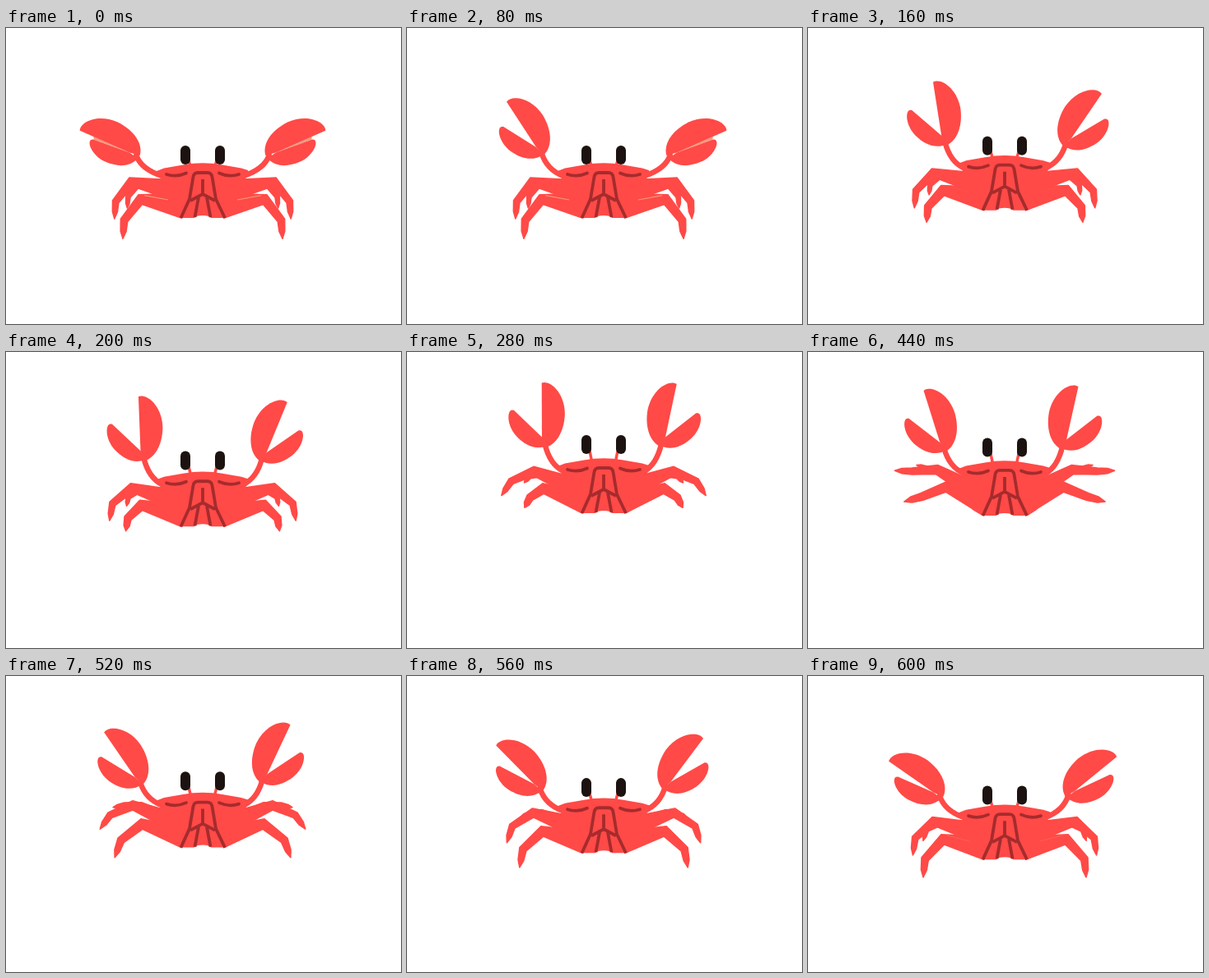
An HTML page for the animation above (640 ms loop, 480 by 360 pixels).

```html
<!DOCTYPE html>
<html lang="en">
<head>
<meta charset="utf-8">
<title>Jumping crab</title>
<style>
  html, body { margin: 0; width: 100%; height: 100%; overflow: hidden; background: #fff; }
  svg { display: block; width: 480px; height: 360px; }
  .red { fill: #ff4a47; }
  .leg { stroke: #ff4a47; stroke-width: 1.5; stroke-linejoin: round; }
  .arm { fill: none; stroke: #ff4a47; stroke-width: 6.5; stroke-linecap: round; }
  .marks { fill: none; stroke: #a62b2d; stroke-width: 3.8; stroke-linejoin: round; }
  .brow { stroke-linecap: round; }
  .seam { stroke: #f09a78; stroke-width: 1.2; }
  .gap { fill: #f39a7c; }
  .stalk { stroke: #ff4a47; stroke-width: 3.5; }
  .eye { fill: #1c1310; }
</style>
</head>
<body>
<svg viewBox="0 0 480 360">
  <g id="legs"></g>
  <g id="body">
    <path class="red" d="M183 174 L192 170.5 L215 166.5 Q239 162 263 166.5 L286 170.5 L294 173 Q296 178 291 183
      L300 188 L292 202 L278 224 L267 231 L249 231 Q247 228 239 228 Q231 228 229 231 L212 231
      L200 224 L186 202 L178 188 L188 183 Z"/>
    <g class="marks">
      <path class="brow" d="M195 178 Q207 182 219 176.5 M259 176.5 Q271 182 283 178"/>
      <path d="M212.5 231 L223 208 L227.5 181 Q228.5 176 233 176 L245 176 Q249.5 176 250.5 181 L255 208 L266 231"/>
      <path d="M239 184 V202 M224 210 L239 202 L254 210 M234 206 L229.5 230 M244 206 L248.5 230"/>
    </g>
  </g>
  <g id="claws"></g>
  <g id="eyes"></g>
</svg>
<script>
const LOOP = 640, STEP = 40;
const JUMP = { start: 80, top: 320, land: 635, height: 37.5 };
const FLARE = { start: 80, peak: 440 };

// spread: degrees the shin swings out; settle: how late it comes back; fold: shortening in mid-jump
const LEGS = [
  { top: [190, 186], low: [200, 206], thigh: 35, shin: 20, width: 3.4, spread: 65, settle: 2, fold: 0.3 },
  { top: [190, 184], low: [192, 206], thigh: 40, shin: 30, width: 4.7, spread: 48, settle: 1, fold: 0 },
  { top: [194, 202], low: [213, 231], thigh: 41, shin: 32, width: 5.3, spread: 30, settle: 0.7, fold: 0.4 }
];
const CLAWS = [
  { start: 0, peak: 240, hold: 260, swing: 66, small: 24 },
  { start: 80, peak: 280, hold: 420, swing: 54, small: 18 }
];

const RAD = Math.PI / 180;
const clamp = x => Math.max(0, Math.min(1, x));
const part = (t, from, to) => clamp((t - from) / (to - from));
const polar = ([x, y], deg, r) => [x + r * Math.cos(deg * RAD), y + r * Math.sin(deg * RAD)];
const smooth = x => x * x * (3 - 2 * x);

function add(parent, tag, attrs) {
  const el = document.createElementNS('http://www.w3.org/2000/svg', tag);
  set(el, attrs);
  return parent.appendChild(el);
}
function set(el, attrs) {
  for (const key in attrs) el.setAttribute(key, attrs[key]);
}
const byId = id => document.getElementById(id);

function jump(t) {
  const up = (1 - Math.cos(Math.PI * part(t, JUMP.start, JUMP.top))) / 2;
  const down = 1 - part(t, JUMP.top, JUMP.land) ** 2;
  return -JUMP.height * up * down;
}

function clawOpening(t, { start, peak, hold }) {
  return Math.sin(90 * RAD * part(t, start, peak)) * Math.cos(90 * RAD * part(t, hold, LOOP));
}

// Joints from hip to tip; the foot follows the shin with a delay.
function legJoints(t, leg, rise) {
  const out = part(t, FLARE.start, FLARE.peak);
  const flare = smooth(out) * (1 - part(t, FLARE.peak, LOOP) ** leg.settle);
  const size = 1 - leg.fold * Math.sin(Math.PI * out) ** 2;
  const hip = [(leg.top[0] + leg.low[0]) / 2, (leg.top[1] + leg.low[1]) / 2 + rise];
  const knee = polar(hip, 191 + 19 * flare, leg.thigh);
  const ankle = polar(knee, 128 + leg.spread * flare, leg.shin * size);
  const foot = 94 + (leg.spread + 40) * flare * flare;
  const ball = polar(ankle, foot, leg.shin * size * 0.42);
  return [hip, knee, ankle, ball, polar(ankle, foot, leg.shin * size * 0.7)];
}

function legOutline(joints, { top, low, width }, rise) {
  const left = [[top[0], top[1] + rise]], right = [[low[0], low[1] + rise]];
  const heading = (a, b) => Math.atan2(b[1] - a[1], b[0] - a[0]) / RAD;
  const taper = [0, 1.2, 0.85, 0.65];
  for (let i = 1; i < 4; i++) {
    const before = heading(joints[i - 1], joints[i]);
    const turn = (heading(joints[i], joints[i + 1]) - before + 540) % 360 - 180;
    const normal = before + turn / 2 + 90, w = width * taper[i];
    left.push(polar(joints[i], normal, w));
    right.push(polar(joints[i], normal, -w));
  }
  return [...left, joints[4], ...right.reverse()];
}

function makeSide(claw, mirrored) {
  const flip = mirrored ? { transform: 'matrix(-1 0 0 1 478 0)' } : {};
  const [legGroup, clawGroup, eyeGroup] = ['legs', 'claws', 'eyes'].map(id => add(byId(id), 'g', flip));
  const legs = LEGS.map(() => add(legGroup, 'polygon', { class: 'red leg' }));
  const seam = add(clawGroup, 'line', { class: 'seam' });
  const arm = add(clawGroup, 'path', { class: 'arm' });
  const gap = add(clawGroup, 'path', { class: 'gap' });
  const big = add(clawGroup, 'path', { class: 'red', d: 'M0 0 L66 0 C70 10 54 28 28 28 C5 27 -11 16 -13 2 Z' });
  const small = add(clawGroup, 'path', { class: 'red', d: 'M0 0 L47 0 C56 -3 43 -19 24 -20.5 C8 -21.5 -6 -17 -12 -3 Z' });
  const stalk = add(eyeGroup, 'line', { class: 'stalk', x1: 221.5, x2: 225 });
  const eye = add(eyeGroup, 'rect', { class: 'eye', x: 212, width: 12, height: 23, rx: 6 });

  function poseLegs(t, rise) {
    let joints;
    LEGS.forEach((leg, i) => {
      joints = legJoints(t, leg, rise);
      set(legs[i], { points: legOutline(joints, leg, rise).join(' ') });
    });
    const [kx, ky] = joints[1];
    set(seam, { x1: 197, y1: 209 + rise, x2: kx + 5, y2: ky - 5, opacity: clamp(1 + rise / 10) });
  }

  function poseClaw(t, rise) {
    const open = clawOpening(t, claw);
    const joint = [150 + 14 * open, 151.5 - 13 * open + rise];
    const bigTurn = -156 + claw.swing * open, smallTurn = -160 + claw.small * open;
    const [sx, sy] = polar(joint, (bigTurn + smallTurn) / 2, -9);
    const place = turn => ({ transform: `translate(${joint}) rotate(${turn})` });
    set(big, place(bigTurn));
    set(small, place(smallTurn));
    set(arm, { d: `M${sx} ${sy} Q${sx + 6} ${172 + rise} 190 ${180 + rise}` });
    set(gap, {
      d: `M${joint} L${polar(joint, bigTurn, 48)} L${polar(joint, smallTurn, 46)} Z`,
      opacity: clamp((9 - bigTurn + smallTurn) / 5)
    });
  }

  return (t, rise) => {
    const lift = rise * 1.2;
    poseLegs(t, rise);
    poseClaw(t, rise);
    set(stalk, { y1: 160 + lift, y2: 170 + rise });
    set(eye, { y: 143 + lift });
  };
}

const sides = CLAWS.map((claw, i) => makeSide(claw, i === 1));
const began = performance.now();

function draw(now) {
  const t = Math.floor(Math.max(0, now - began) % LOOP / STEP) * STEP;
  const rise = jump(t);
  set(byId('body'), { transform: `translate(0 ${rise})` });
  for (const pose of sides) pose(t, rise);
  requestAnimationFrame(draw);
}
draw(began);
</script>
</body>
</html>
```
